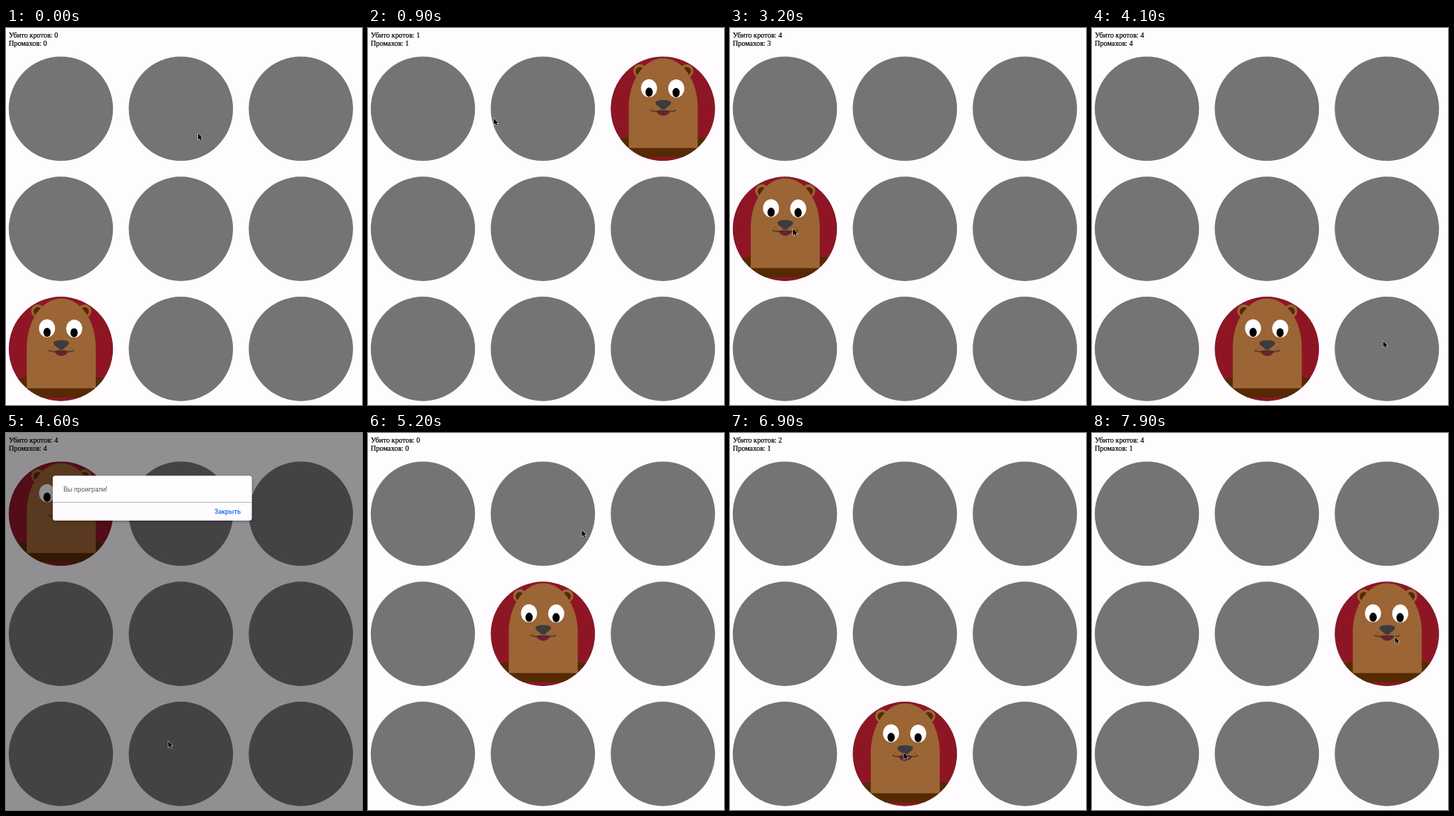
These frames come from a looping animation (480 by 508 pixels, 8 s). An HTML page:

```html
<!DOCTYPE html>
<html lang="ru">
<head>
<meta charset="utf-8">
<style>
  html, body { margin: 0; width: 100%; height: 100%; overflow: hidden; background: #fefcff; }
  svg { display: block; width: 480px; height: 508px; }
  .score { font: 9.85px "Liberation Serif", "Times New Roman", serif; stroke: #000; stroke-width: .2; }
  .dialog { font: 8.65px Roboto, sans-serif; fill: #59595b; }
  .dialog .close { font-size: 8.5px; font-weight: 700; fill: #3b7cec; }
  .panel { filter: drop-shadow(0 1px 2px #0005); }
</style>
</head>
<body>
<svg viewBox="0 0 480 508">
  <defs>
    <clipPath id="hole"><circle r="70.3"/></clipPath>
  </defs>
  <g class="score">
    <text x="3.7" y="13">Убито кротов: <tspan id="hits">0</tspan></text>
    <text x="3.7" y="24">Промахов: <tspan id="misses">0</tspan></text>
  </g>
  <g id="holes" fill="#757375"></g>

  <g id="mole" clip-path="url(#hole)">
    <circle r="70.3" fill="#8e1624"/>
    <path d="M-70 46Q-58 38-46 38H47Q59 38 71 46V65.5H-70Z" fill="#552a02"/>
    <g fill="#9b6535">
      <circle cx="-31" cy="-51" r="9"/>
      <circle cx="32" cy="-51" r="9"/>
    </g>
    <g fill="#552a02">
      <circle cx="-31" cy="-50.5" r="5.8"/>
      <circle cx="32" cy="-50.5" r="5.8"/>
    </g>
    <path d="M-46 53V-2A46.5 66 0 0 1 47 -2V53Z" fill="#9b6535"/>
    <g fill="#fff">
      <ellipse cx="-18.7" cy="-27.7" rx="10.8" ry="12.2"/>
      <ellipse cx="18" cy="-27.3" rx="10.8" ry="12.2"/>
    </g>
    <ellipse cx="-18.6" cy="-22.3" rx="4.9" ry="6.2"/>
    <ellipse cx="17.8" cy="-21.8" rx="4.9" ry="6.2"/>
    <path d="M-9 3Q-4 1 .7 2.5Q5 1 10 3Q7 9.5 .7 9.5Q-6 9.5-9 3Z" fill="#6b2130"/>
    <path d="M-17 2Q-8 5.5 .7 2.5Q9 5.5 18 2" fill="none" stroke="#4a3028" stroke-width="1.3"/>
    <path d="M-10-8C-10-13 11-13 11-8C11-4 5-3 3 1H-2C-4-3-10-4-10-8Z" fill="#3d3b3d"/>
    <path d="M-13-2h1M-11 1h1M-15 0h1M13-2h1M11 1h1M15 0h1" stroke="#6b421f"/>
  </g>

  <g id="alert" class="dialog">
    <path d="M0 0H480V508H0Z" fill="#050306" fill-opacity=".44"/>
    <rect class="panel" x="63" y="57.5" width="268.5" height="60.5" rx="3.5" fill="#fefcff"/>
    <path d="M63 93.5H331.5" stroke="#b3b2b4"/>
    <text x="77.5" y="79.3">Вы проиграли!</text>
    <text class="close" x="281" y="109.3">Закрыть</text>
  </g>

  <path id="cursor" d="M0 0V8.6L2 6.9L3.4 10L4.9 9.3L3.5 6.4H6.1Z"
        stroke="#fff" stroke-width="1" paint-order="stroke"/>
</svg>
<script>
const LOOP = 8000, STEP = 100, HOP = 720, PITCH = 161.8;
const LOST = 4500, CLOSED = 5200;
const $ = id => document.getElementById(id);
const place = (el, x, y) => el.setAttribute('transform', `translate(${x} ${y})`);
const center = i => [74 + i % 3 * PITCH, 108.8 + Math.floor(i / 3) * PITCH];
const count = (t, from, every, max) =>
  Math.min(max, Math.max(0, Math.floor((t - from) / every)));

// The mole takes the next hole every HOP; the pointer chases the first few.
const games = [
  { start: 100, holes: [6, 2, 3, 5, 3, 7, 0], chased: 5,
    hits: t => count(t, -120, HOP, 4), misses: t => count(t, 0, 900, 4) },
  { start: CLOSED, holes: [4, 3, 7, 5], chased: 4,
    hits: t => count(t, 5500, 600, 4), misses: t => count(t, CLOSED, HOP, 1) },
];

const chase = games.flatMap(g => g.holes.slice(0, g.chased).map((hole, i) => {
  const [x, y] = center(hole);
  return { t: g.start + i * HOP + 300, x, y };
}));
const detours = [[0, 259, 142], [900, 169.5, 121.5], [2100, 198.5, 311], [4100, 392.5, 421.5],
  [4600, 218.5, 415], [5100, 298, 105], [6000, 245.5, 229], [7900, 408.5, 274.5]]
  .map(([t, x, y]) => ({ t, x, y }));
const stops = [...chase, ...detours].sort((a, b) => a.t - b.t);

function pointerAt(t) {
  const i = stops.findLastIndex(s => s.t <= t);
  const a = stops[i], b = stops[i + 1] || a;
  const u = (t - a.t) / (b.t - a.t || 1);
  const k = u * u * (3 - 2 * u);
  return [a.x + (b.x - a.x) * k, a.y + (b.y - a.y) * k];
}

for (let i = 0; i < 9; i++) {
  const [x, y] = center(i);
  $('holes').innerHTML += `<circle cx="${x}" cy="${y}" r="70.3"/>`;
}

const begin = performance.now();
function draw(now) {
  const t = Math.floor(Math.max(0, now - begin) % LOOP / STEP) * STEP;
  const game = games[t < CLOSED ? 0 : 1];
  const hop = count(t, game.start, HOP, game.holes.length - 1);
  $('hits').textContent = game.hits(t);
  $('misses').textContent = game.misses(t);
  place($('mole'), ...center(game.holes[hop]));
  $('alert').style.display = t >= LOST && t < CLOSED ? '' : 'none';
  place($('cursor'), ...pointerAt(t));
  requestAnimationFrame(draw);
}
draw(begin);
</script>
</body>
</html>
```
